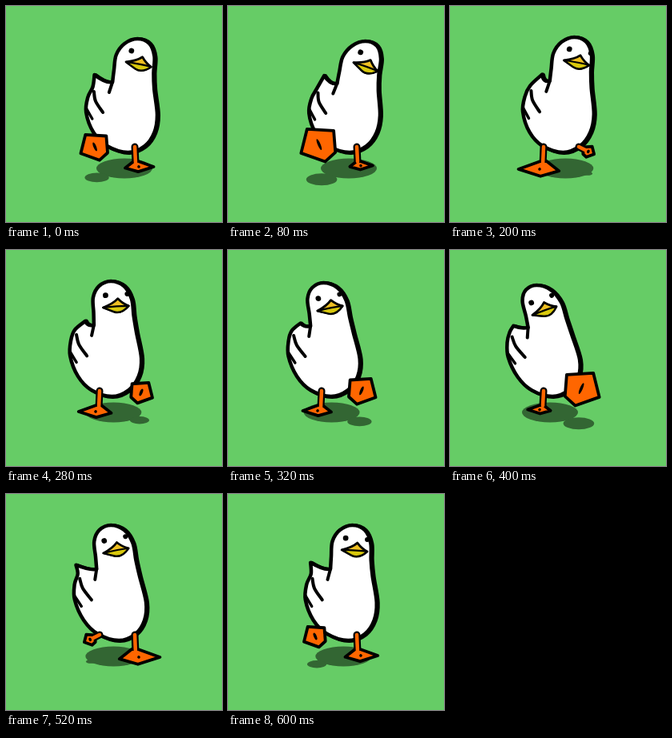
Animation, 270 px wide and 270 px high, one loop 0.64 s. Source, as an HTML page with a canvas:

```html
<!DOCTYPE html>
<html>
<head>
<meta charset="utf-8">
<style>
html, body { margin: 0; height: 100%; overflow: hidden; background: #66cc66; }
canvas { display: block; width: 100vw; height: 100vh; }
</style>
</head>
<body>
<canvas id="stage" width="270" height="270"></canvas>
<script>
const ctx = document.getElementById('stage').getContext('2d');
const { sin, cos, abs, max, min, PI } = Math;
const LOOP = 640, STEP = 40, AXIS = 139;
const GRASS = '#66cc66', SHADE = '#336633', ORANGE = '#ff6600';

// Resting outline, from the neck over the head and round to the tail
const OUTLINE = [
  [117,95], [117,80], [117,61], [125,47], [140,41], [156,47], [165,63], [167,84], [170,104],
  [176,136], [173,158], [161,175], [140,183], [114,175], [97,158], [87,133], [88,114], [93,101]
];
const CREASE = [[117,95], [114,108]];
const WING = [[95,107], [98,119], [108,133]];
const FEATHER = [[87,128], [95,141]];

// Webbed foot of the right leg: seen from below, and flat on the ground
const SOLE = [[14,-18], [-17,-16], [-19,9], [-7,20], [21,10]];
const FLAT = [[-1,-9], [-8,-9], [-22,2], [-1,8], [24,0]];

const mix = (a, b, k) => a + (b - a) * k;
const smooth = k => (k = max(0, min(1, k)), k * k * (3 - 2 * k));

function polygon(points) {
  const path = new Path2D();
  points.forEach(p => path.lineTo(...p));
  path.closePath();
  return path;
}

function spline(p) {
  const path = new Path2D();
  path.moveTo(...p[0]);
  for (let i = 0; i < p.length - 1; i++) {
    const b = p[i], c = p[i + 1], before = p[i - 1] || b, after = p[i + 2] || c;
    path.bezierCurveTo(
      b[0] + (c[0] - before[0]) / 6, b[1] + (c[1] - before[1]) / 6,
      c[0] - (after[0] - b[0]) / 6, c[1] - (after[1] - b[1]) / 6, ...c);
  }
  return path;
}

function stroke(path, width, color = '#000') {
  ctx.lineWidth = width;
  ctx.strokeStyle = color;
  ctx.stroke(path);
}

function shape(path, color, width) {
  ctx.fillStyle = color;
  ctx.fill(path);
  stroke(path, width);
}

function oval(x, y, rx, ry, color = '#000', turn = 0) {
  ctx.fillStyle = color;
  ctx.beginPath();
  ctx.ellipse(x, y, max(rx, 0), max(ry, 0), turn, 0, 7);
  ctx.fill();
}

// Runs a drawing in other coordinates
function within(x, y, turn, flip, paint) {
  ctx.save();
  ctx.translate(x, y);
  ctx.rotate(turn);
  ctx.scale(flip, 1);
  paint();
  ctx.restore();
}

// State of one leg; x counts outward from the middle of the duck
function legAt(time) {
  const away = abs((time + 338) % LOOP - 320);
  const raise = smooth((190 - away) / 90);
  const wave = cos(2 * PI * (time - 80) / LOOP - 0.35);
  const swing = 0.65 + 0.45 * wave, stance = 0.9 + 0.3 * wave;
  return {
    raise, swing,
    x: mix(27, 38 - 12 * swing, raise),
    y: mix(194 + 9 * stance, 186 - 12 * swing, raise),
    foot: FLAT.map((p, i) => p.map((v, j) => mix(v * stance, SOLE[i][j] * swing, raise)))
  };
}

function drawLeg({ raise, swing, x, y, foot }) {
  const ankle = [x - 4 * (1 - raise), y - 5 * (1 - raise)];
  const bone = polygon([[22, 176], ankle]);
  ctx.lineCap = 'butt';
  stroke(bone, 9);
  shape(polygon(foot.map(([fx, fy]) => [x + fx, y + fy])), ORANGE, 3.8);
  stroke(bone, 4.5, ORANGE);
  ctx.lineCap = 'round';
  oval(x, y, 1.8, mix(1.8, 7 * swing, raise), '#000', 0.4);
}

function drawFace(c) {
  const beak = new Path2D('M-16 0Q-3 -4 3 -10Q9 -3 16 0Q6 10 -3 6Z');
  const lower = new Path2D('M-16 0Q4 -1 16 0Q6 10 -3 6Z');
  oval(-12, -15, 3.4, 3.4);
  if (c < 0.65) oval(15, -15, 3, 3);
  shape(beak, '#eebf22', 2.8);
  shape(lower, '#d8c80c', 2.2);
}

function draw(time) {
  const phase = 2 * PI * (time - 80) / LOOP;
  const s = sin(phase), c = cos(phase) + 0.12 * s * s, bob = 3 * cos(2 * phase);

  // The body leans more the higher up, while the hips lag behind
  const sway = ([x, y]) => {
    const height = (180 - y) / 140;
    return [x + c * (12 + 20 * height * height) - s * (y - 40) / 30, y + bob * height];
  };
  const bend = points => spline(points.map(sway));
  const legs = [[-1, legAt(time)], [1, legAt(time + LOOP / 2)]];

  ctx.fillStyle = GRASS;
  ctx.fillRect(0, 0, 270, 270);
  ctx.lineJoin = ctx.lineCap = 'round';

  oval(138 + 13 * c, 203, 35, 12.5, SHADE);
  for (const [side, { raise, swing }] of legs) {
    oval(AXIS + side * (38 - 15 * swing), 206 + 10 * swing, 18 * swing * raise, 7 * swing * raise, SHADE);
  }

  const tail = [99 + 8 * s, 89 - 4 * c];
  const body = bend([...OUTLINE, tail]);
  body.quadraticCurveTo(...sway([109, 97]), ...sway(OUTLINE[0]));
  body.closePath();
  within(1.5, 0.5, 0, 1, () => stroke(body, 5));
  shape(body, '#fff', 4.5);
  stroke(bend(CREASE), 4);
  stroke(bend(WING), 4);
  stroke(bend(FEATHER), 3.5);

  for (const [side, leg] of legs.reverse()) within(AXIS, 0, 0, side, () => drawLeg(leg));
  within(145 + 27 * c, 73 + bob, 0.35 * cos(phase - 0.2), 1, () => drawFace(c));
}

function frame() {
  draw(Math.floor(performance.now() % LOOP / STEP) * STEP);
  requestAnimationFrame(frame);
}
frame();
</script>
</body>
</html>
```
